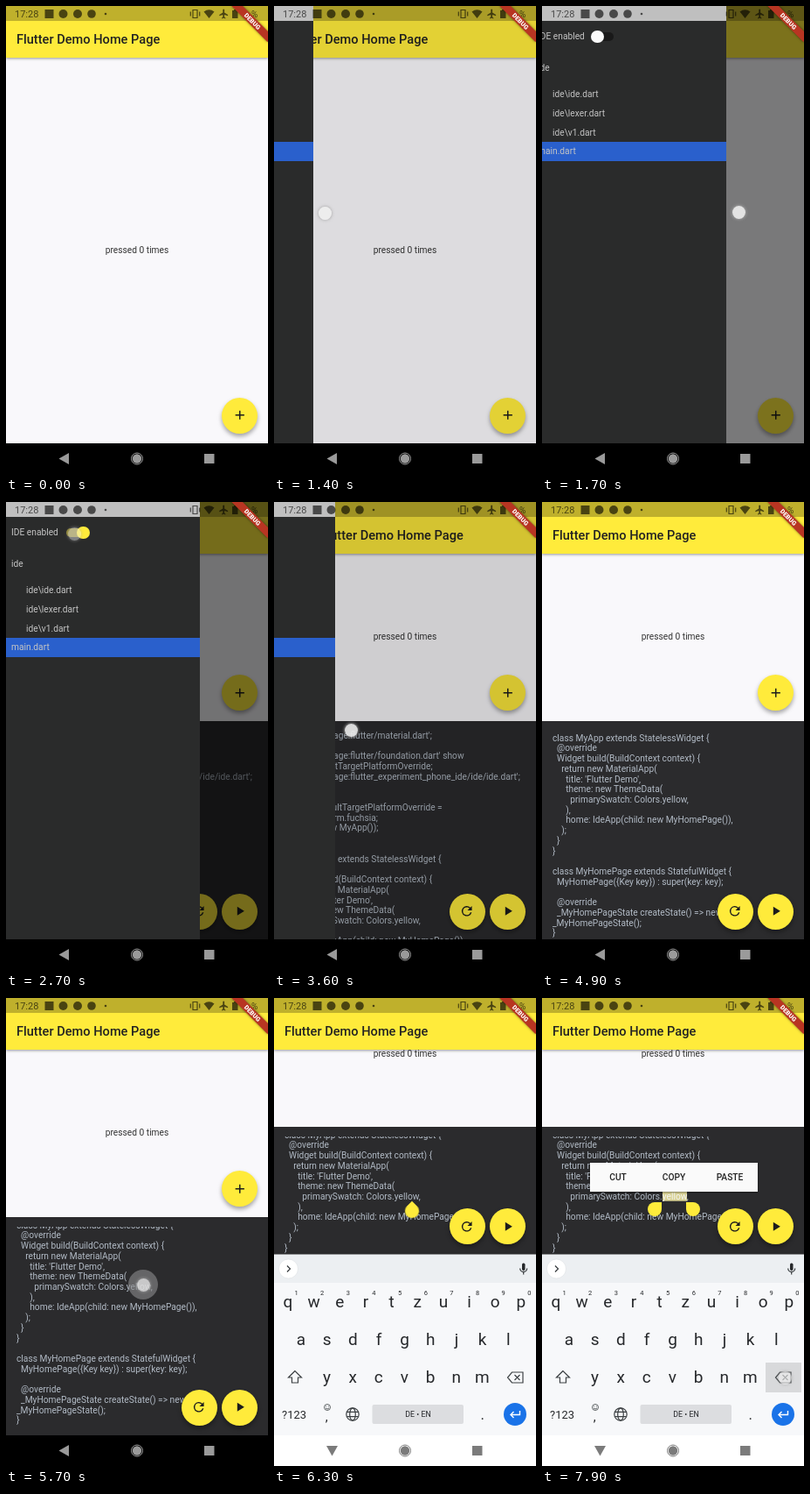
Write an HTML page that moves like this. It is 300x534 px and loops after 8 s.

```html
<!DOCTYPE html>
<html lang="en">
<head>
<meta charset="utf-8">
<title>Phone IDE demo</title>
<style>
html, body { margin: 0; height: 100%; overflow: hidden; background: #000; }
.stage {
  --edge: 0; --page: 499; --floor: 499; --label: 279; --fab: 467;
  position: relative; width: 300px; height: 534px; overflow: hidden;
  font: 10.22px/12px Roboto, sans-serif; color: #333;
}
.stage, .stage * { animation-duration: 8s; animation-timing-function: step-end; animation-iteration-count: infinite; }
.stage { animation-name: drawer, layout; }
.stage div, .stage svg { position: absolute; }
.stage svg { left: 0; top: 0; overflow: visible; }

/* One percent of the loop is 80 ms. */
@keyframes drawer {
  16.25% { --edge: 10; }
  17.5% { --edge: 45; }
  18.75% { --edge: 110; }
  20% { --edge: 174; }
  21.25% { --edge: 211; }
  22.5% { --edge: 222; }
  43.75% { --edge: 198; }
  45% { --edge: 70; }
  46.25% { --edge: 20; }
  47.5% { --edge: 0; }
}
@keyframes layout {
  32.5% { --page: 249.5; --label: 154; --fab: 217.5; }
  73.75% { --page: 146.5; --floor: 292.5; --label: 64; --fab: -60; }
}

/* App page */
.page { left: 0; top: 0; width: 300px; height: calc(var(--page) * 1px); background: #f9f8fb; overflow: hidden; }
.bar { width: 300px; height: 58.5px; background: #ffeb3b; box-shadow: 0 1px 3px rgba(0,0,0,.4); }
.title { left: 12px; top: 28px; font-size: 14.6px; line-height: 20px; font-weight: 500; color: #222; white-space: nowrap; animation-name: title; }
@keyframes title { 25% { transform: translateX(40.5px); } 47.5% { transform: none; } }
.label { width: 300px; top: calc(var(--label) * 1px - 6px); text-align: center; }
.fab {
  width: 41px; height: 41px; margin: -20.5px; border-radius: 50%; background: #ffeb3b;
  box-shadow: 0 3px 5px rgba(0,0,0,.35);
}
.fab svg { left: 11.75px; top: 11.75px; width: 17.5px; height: 17.5px; fill: #1c1c1c; }
.add { left: 267.7px; top: calc(var(--fab) * 1px); }
.ide .fab { top: calc((var(--floor) - var(--page) - 32) * 1px); }

/* Code panel */
.ide {
  left: 0; top: calc(var(--page) * 1px); width: 300px; height: calc((var(--floor) - var(--page)) * 1px);
  background: #2b2b2d; color: #b2bbc6; overflow: hidden;
}
.view { left: 0; top: 11.5px; width: 300px; bottom: 0; overflow: hidden; }
pre { margin: 0 0 0 12px; font: inherit; line-height: 11.72px; animation-name: scroll; }
@keyframes scroll {
  56.25% { transform: translateY(-14.5px); }
  57.5% { transform: translateY(-61px); }
  58.75% { transform: translateY(-100px); }
  60% { transform: translateY(-125px); }
  61.25% { transform: translateY(-138px); }
  62.5% { transform: translateY(-144px); }
  63.75% { transform: translateY(-147px); }
  65%, 100% { transform: translateY(-148.3px); }
}
.sel { animation-name: sel; }
@keyframes sel { 88.75%, 100% { background: #d9d294; color: #f4f4f4; } }

.scrim { width: 300px; height: 499px; background: #000; opacity: calc(var(--edge) / 222 * .54); }
.drawer { left: calc((var(--edge) - 222) * 1px); top: 0; width: 222px; height: 499px; background: #fff; color: #c4c4c4; }
.files { top: 17px; width: 222px; bottom: 0; background: #2a2b2b; }
.row { left: 0; width: 199px; height: 22px; line-height: 22px; padding-left: 6px; white-space: nowrap; }
.file { padding-left: 23px; }
.on { width: 216px; background: #2a60cc; }
.track { left: 69px; top: 30px; width: 24px; height: 10px; border-radius: 5px; background: #191919; animation-name: track; }
.thumb { left: 67px; top: 27.7px; width: 14.6px; height: 14.6px; border-radius: 50%; background: #fafafa; animation-name: thumb; }
@keyframes track { 32.5%, 100% { background: #8f8532; } }
@keyframes thumb {
  32.5% { transform: translateX(7px); background: #ffeb3b; }
  33.75%, 100% { transform: translateX(14px); background: #ffeb3b; }
}

.status { width: 300px; height: 17px; background: rgba(0,0,0,.25); }
.banner {
  left: 253.3px; top: 13.1px; width: 58.4px; height: 8.8px; transform: rotate(45deg);
  background: #b83522; box-shadow: 0 0 3px rgba(0,0,0,.5);
  color: #fff; font-size: 7.2px; line-height: 9px; font-weight: 900; text-align: center;
}

/* Editing overlays */
.handle { width: 16px; height: 16px; background: #ffeb3b; border-radius: 0 50% 50% 50%; opacity: 0; }
.caret { left: 150px; top: 235px; transform: rotate(45deg); animation-name: caret; }
@keyframes caret { 78.75% { opacity: 1; } 88.75% { opacity: 0; } }
.start { left: 121px; top: 233px; border-radius: 50% 0 50% 50%; }
.end { left: 165px; top: 233px; }
.start, .end { animation-name: pair; }
@keyframes pair { 88.75%, 100% { opacity: 1; } }
.tools {
  left: 55px; top: 188px; width: 192px; height: 32.5px; line-height: 33px; background: #fafafa;
  box-shadow: 0 1px 2px rgba(0,0,0,.4); color: #222; font-weight: 500; opacity: 0; animation-name: tools;
}
.tools div { width: 64px; text-align: center; }
@keyframes tools { 88.75% { opacity: .5; } 90%, 100% { opacity: 1; } }

/* Keyboard and navigation */
.keys { left: 0; top: 292.5px; width: 300px; height: 207px; background: #f7f8fa; transform: translateY(242px); animation-name: keys; }
@keyframes keys {
  72.5% { transform: translateY(130px); }
  73.75% { transform: translateY(32px); }
  75%, 100% { transform: none; }
}
.keys svg { top: -292.5px; }
.press { opacity: 0; animation-name: press; }
@keyframes press { 98.75%, 100% { opacity: 1; } }
.nav { top: 499px; width: 300px; height: 35px; background: #000; color: #9a9a9a; animation-name: nav; }
@keyframes nav { 73.75%, 100% { background: #fff; color: #7b7b7b; } }
.back { transform-origin: 66.5px 17.5px; animation-name: back; }
@keyframes back { 73.75%, 100% { transform: rotate(-90deg); } }

/* Finger marks */
.touch, .halo, .trail { left: 0; top: 0; border-radius: 50%; opacity: 0; }
.touch { width: 15px; height: 15px; margin: -7.5px; background: rgba(238,238,238,.9); box-shadow: 0 0 3px 1px rgba(170,170,170,.7); animation-name: touch; }
.halo { left: 157px; top: 327px; width: 34px; height: 34px; margin: -17px; background: rgba(140,140,142,.6); animation-name: halo; }
.trail { left: 202px; top: 403px; width: 9px; height: 9px; margin: -4.5px; background: #5e5e60; animation-name: trail; }
@keyframes halo { 71.25% { opacity: 1; } 72.5% { opacity: .4; } 73.75% { opacity: 0; } }
@keyframes trail { 56.25% { opacity: 1; } 57.5% { opacity: 0; } }
@keyframes touch {
  16.25% { opacity: 1; transform: translate(8px, 236px); }
  17.5% { opacity: 1; transform: translate(58px, 236px); }
  18.75% { opacity: 1; transform: translate(124px, 236px); }
  20% { opacity: 1; transform: translate(188px, 235px); }
  21.25% { opacity: 1; transform: translate(225px, 235px); }
  22.5% { opacity: 1; transform: translate(237px, 235px); }
  23.75% { opacity: .5; transform: translate(237px, 235px); }
  25% { opacity: 0; }
  31.25% { opacity: 1; transform: translate(78px, 36px); }
  33.75% { opacity: .5; transform: translate(78px, 36px); }
  35% { opacity: 0; }
  43.75% { opacity: 1; transform: translate(216px, 258px); }
  45% { opacity: 1; transform: translate(88px, 260px); }
  46.25% { opacity: 1; transform: translate(38px, 261px); }
  47.5% { opacity: .5; transform: translate(30px, 261px); }
  48.75% { opacity: 0; }
  55% { opacity: 1; transform: translate(202px, 403px); }
  56.25% { opacity: 1; transform: translate(204px, 378px); }
  57.5% { opacity: 1; transform: translate(206px, 331px); }
  58.75% { opacity: 1; transform: translate(207px, 292px); }
  60% { opacity: .5; transform: translate(208px, 268px); }
  61.25% { opacity: 0; }
  71.25% { opacity: .8; transform: translate(157px, 327px); }
  72.5% { opacity: .4; transform: translate(157px, 327px); }
  73.75% { opacity: 0; }
  81.25% { opacity: .9; transform: translate(157px, 227px); }
  91.25% { opacity: .4; transform: translate(157px, 227px); }
  92.5% { opacity: 0; }
  98.75%, 100% { opacity: .7; transform: translate(278px, 433px); }
}
</style>
</head>
<body>
<div class="stage">
  <div class="page">
    <div class="label">pressed 0 times</div>
    <div class="bar"><div class="title">Flutter Demo Home Page</div></div>
    <div class="fab add"><svg viewBox="0 0 24 24"><path d="M19 13h-6v6h-2v-6H5v-2h6V5h2v6h6z"/></svg></div>
  </div>

  <div class="ide">
    <div class="view"><pre>import 'package:flutter/material.dart';

import 'package:flutter/foundation.dart' show
debugDefaultTargetPlatformOverride;
import 'package:flutter_experiment_phone_ide/ide/ide.dart';

void main() {
  debugDefaultTargetPlatformOverride =
TargetPlatform.fuchsia;
  runApp(new MyApp());
}

class MyApp extends StatelessWidget {
  @override
  Widget build(BuildContext context) {
    return new MaterialApp(
      title: 'Flutter Demo',
      theme: new ThemeData(
        primarySwatch: Colors.<span class="sel">yellow</span>,
      ),
      home: IdeApp(child: new MyHomePage()),
    );
  }
}

class MyHomePage extends StatefulWidget {
  MyHomePage({Key key}) : super(key: key);

  @override
  _MyHomePageState createState() =&gt; new
_MyHomePageState();
}
</pre></div>
    <div class="fab" style="left:221px"><svg viewBox="0 0 24 24"><path d="M17.65 6.35A8 8 0 1 0 19.73 14h-2.08A6 6 0 1 1 12 6c1.66 0 3.14.69 4.22 1.78L13 11h7V4z"/></svg></div>
    <div class="fab" style="left:267.7px"><svg viewBox="0 0 24 24"><path d="M8 5v14l11-7z"/></svg></div>
  </div>

  <div class="scrim"></div>
  <div class="drawer">
    <div class="files"></div>
    <div class="row" style="top:24px">IDE enabled</div>
    <div class="track"></div><div class="thumb"></div>
    <div class="row" style="top:60px">ide</div>
    <div class="row file" style="top:90px">ide\ide.dart</div>
    <div class="row file" style="top:112px">ide\lexer.dart</div>
    <div class="row file" style="top:134px">ide\v1.dart</div>
    <div class="row on" style="top:155px">main.dart</div>
  </div>

  <div class="status">
    <svg width="300" height="17" fill="#000" fill-opacity=".62">
      <text x="10" y="13" font-size="11">17:28</text>
      <rect x="44.5" y="4" width="10" height="10"/>
      <circle cx="65.5" cy="9" r="5"/><circle cx="82" cy="9" r="5"/><circle cx="98" cy="9" r="4.8"/>
      <circle cx="114" cy="9" r="1.3"/>
      <path d="M214 4.5h5v9h-5zM211.3 6.5v5M221.7 6.5v5" fill="none" stroke="#000" stroke-opacity=".62" stroke-width="1.2"/>
      <path d="M226.5 6.5q6-4.5 12 0L232.500 14z"/>
      <path d="M248.300 4q.9-1 1.800 0v3.500l4 2.500v1.200l-4-1.200v2.500l1.200 1v.9l-2.100-.6-2.100.6v-.9l1.200-1v-2.500l-4 1.200V10l4-2.500z"/>
      <path d="M259 5h2V4h2.500v1h2v9H259z"/>
      <text x="281" y="13" font-size="10">%</text>
    </svg>
  </div>
  <div class="banner">DEBUG</div>

  <div class="handle caret"></div>
  <div class="handle start"></div>
  <div class="handle end"></div>
  <div class="tools"><div>CUT</div><div style="left:64px">COPY</div><div style="left:128px">PASTE</div></div>

  <div class="keys">
    <svg width="300" height="534" fill="#26282b">
      <rect y="292.5" width="300" height="32.500" fill="#eceff2"/>
      <circle cx="16.500" cy="309" r="11" fill="#fff" stroke="#dcdfe2" stroke-width=".6"/>
      <g fill="none" stroke="#3c4043" stroke-width="1.3">
        <path d="M15 305.500l3.500 3.500-3.500 3.500"/>
        <path d="M281.700 308.500a4 4 0 0 0 8 0M285.700 312.500v3"/>
      </g>
      <rect x="284" y="302.500" width="3.500" height="8.500" rx="1.700"/>
      <rect class="press" x="256" y="416" width="41" height="34" fill="#d8d9db"/>
      <g id="letters" font-size="19" text-anchor="middle"></g>
      <g fill="none" stroke="#3c4043" stroke-width="1.2">
        <path d="M24 425.500l-7.500 7.500h4v6h7v-6h4z"/>
        <path d="M272.500 427h12.500v12h-12.500l-5-6zM275.500 430l6 6m0-6l-6 6"/>
        <circle cx="90" cy="475" r="7.200"/><ellipse cx="90" cy="475" rx="3.300" ry="7.200"/>
        <path d="M83.500 472.300h13M83.500 477.700h13"/>
        <circle cx="61" cy="467" r="3.500" stroke-width=".8"/><path d="M59 468q2 2 4 0M59.600 465.500v.9M62.400 465.500v.9" stroke-width=".8"/>
      </g>
      <text x="9" y="479.500" font-size="13">?123</text>
      <text x="58.800" y="483" font-size="15">,</text>
      <text x="236.500" y="481" font-size="17">.</text>
      <rect x="112.500" y="464" width="104.500" height="22" rx="2" fill="#dcdde0"/>
      <text x="165" y="478" font-size="8.800" text-anchor="middle">DE • EN</text>
      <circle cx="276" cy="475" r="13" fill="#1a73e8"/>
      <path d="M281.500 471v4.500h-10.500m3.500-3.500l-3.500 3.500 3.500 3.500" fill="none" stroke="#fff" stroke-width="1.400"/>
    </svg>
  </div>

  <div class="nav">
    <svg width="300" height="35" fill="currentColor">
      <path class="back" d="M60.500 17.500l11.500-6.500v13z"/>
      <circle cx="150" cy="17.500" r="5.200"/>
      <circle cx="150" cy="17.500" r="6.500" fill="none" stroke="currentColor"/>
      <rect x="227" y="12" width="11.500" height="11"/>
    </svg>
  </div>

  <div class="halo"></div>
  <div class="trail"></div>
  <div class="touch"></div>
</div>
<script>
const label = (x, y, text, size = 19) => `<text x="${x}" y="${y}" font-size="${size}">${text}</text>`;
const keyRow = (keys, x, y) => [...keys].map((key, i) => label(x + i * 29.65, y, key)).join('');
const digits = [...'1234567890'].map((d, i) => label(25.5 + i * 29.65, 338.5, d, 7.5)).join('');

document.getElementById('letters').innerHTML =
  keyRow('qwertzuiop', 16, 352.5) + digits +
  keyRow('asdfghjkl', 31, 395.5) +
  keyRow('yxcvbnm', 60.5, 438.5);
</script>
</body>
</html>
```
